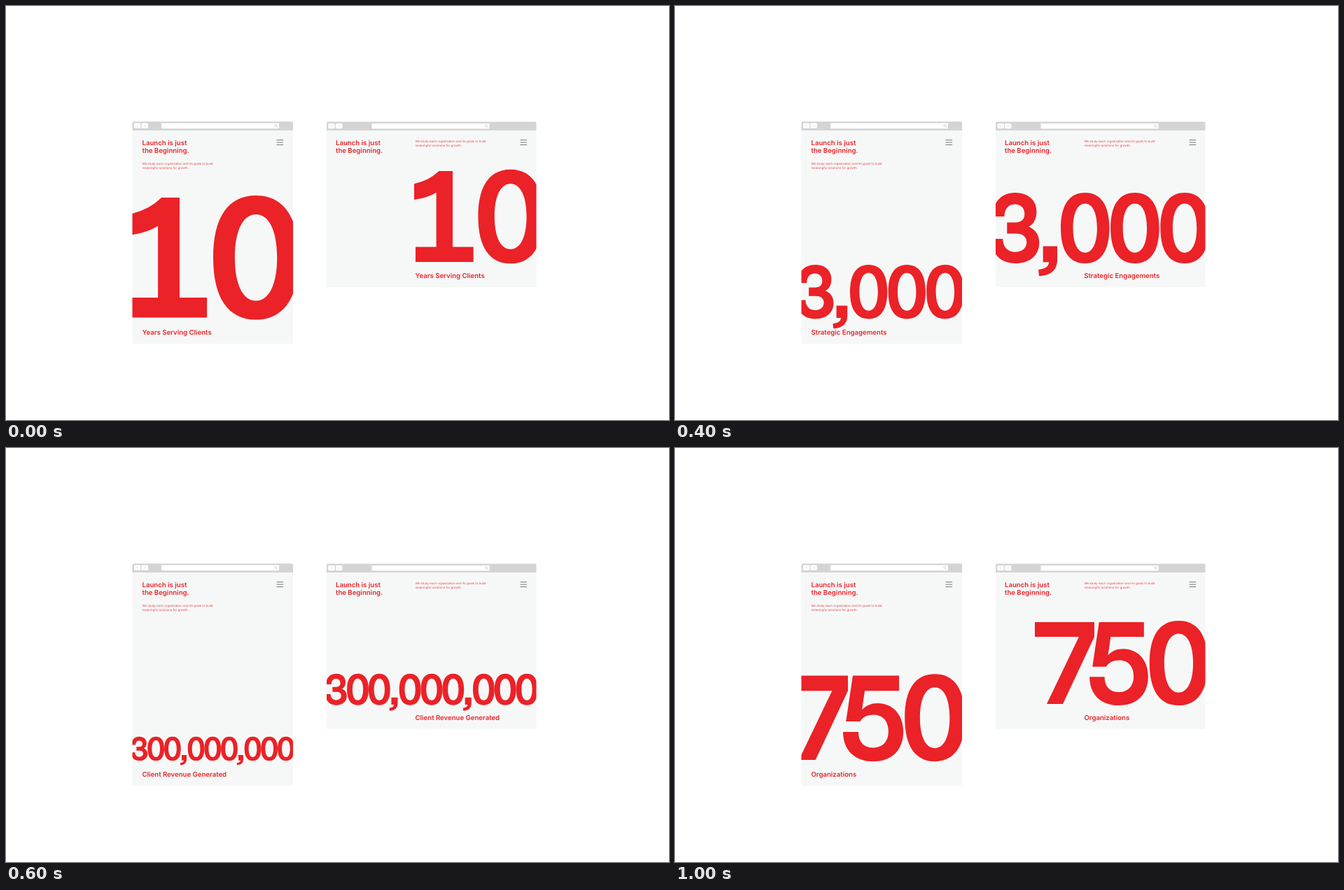
Recreate the animation shown at these times as an HTML page. Size 947 by 592 pixels, loop 1.2 s.

```html
<!DOCTYPE html>
<html lang="en">
<head>
<meta charset="utf-8">
<title>Launch is just the Beginning</title>
<style>
  html, body { margin: 0; width: 100%; height: 100%; overflow: hidden; background: #fff; }
  svg { display: block; width: 947px; height: 592px; }
  text { font-family: Inter, Arial, sans-serif; text-rendering: geometricPrecision; }
  .red { fill: #eb2227; }
  .title { font-size: 9.6px; font-weight: 600; }
  .note { font-size: 4.36px; font-weight: 400; fill-opacity: .85; }
  .page { fill: #f6f8f8; }
  .bar { fill: #d4d4d4; }
  .field { fill: #fff; }
  .icon { fill: none; stroke: #c4c4c4; stroke-width: .7; }
  .menu { fill: none; stroke: #777; stroke-width: 1; }

  .stat { visibility: hidden; animation: 1200ms step-end infinite; }
  .years { animation-name: years; }
  .orgs { animation-name: orgs; }
  .jobs { animation-name: jobs; }
  .revenue { animation-name: revenue; }
  @keyframes years {
    0% { visibility: visible; }
    16.6667%, 100% { visibility: hidden; }
  }
  @keyframes orgs {
    0%, 33.3333% { visibility: hidden; }
    16.6667%, 83.3333% { visibility: visible; }
    100% { visibility: hidden; }
  }
  @keyframes jobs {
    0%, 50%, 83.3333%, 100% { visibility: hidden; }
    33.3333%, 66.6667% { visibility: visible; }
  }
  @keyframes revenue {
    0%, 66.6667%, 100% { visibility: hidden; }
    50% { visibility: visible; }
  }
</style>
</head>
<body>
<svg viewBox="0 0 947 592">
  <defs>
    <!-- numerals: baseline at y 0, cap height 100 -->
    <path id="d0" fill-rule="evenodd" d="M0-50C0-83.7 12.5-101.8 35.6-101.8S71.2-83.7 71.2-50 58.7 1.8 35.6 1.8 0-16.3 0-50ZM18-50C18-27.7 24.7-14 35.6-14S53.2-27.7 53.2-50 46.5-86 35.6-86 18-72.3 18-50Z"/>
    <path id="d1" d="M27.2-100H42.3V-16.6H65.1V0H1.5V-16.6H24.3V-76.4Q14.9-70.5 0-68.5V-86Q16.7-89.5 27.2-100Z"/>
    <path id="d3" d="M0-34.2H16.6C17-22 24-15 35-15C45-15 51.5-21 51.5-29C51.5-37.5 45.5-41.8 36.5-41.8H22.8V-58.3H35.5C44-58.3 48.5-63 48.5-70.5C48.5-79.5 43-85 34.5-85C25-85 19.5-79 18.8-67H2C2-89 15-101.8 35-101.8C54-101.8 66-90.5 66-74C66-64 62-56 54.5-52C64.5-48 70-40 70-28.5C70-10 56 1.8 35 1.8C13.5 1.8 0-11.5 0-34.2Z"/>
    <path id="d5" d="M11.6-100H66.4V-82H25.8L22.5-59.5C27-64.5 33-67.3 41-67.3C59-67.3 71.5-53.5 71.5-33.5C71.5-11.5 57.5 1.8 35.8 1.8C14 1.8 0-11.5 0-33.2H18.3C18.3-21.5 24.5-14.5 35.8-14.5C47-14.5 53.8-22 53.8-33.8C53.8-46 47-53.5 36.5-53.5C29-53.5 23.5-51 20.3-45.6H3.5Z"/>
    <path id="d7" d="M0-100H72.6V-82L34.2 0H14.5L53.8-82H0Z"/>
    <path id="comma" d="M-26-23.4H-5.1V-4C-5.1 11-14 19.5-31.8 20.3L-32.8 11C-23.5 10-17.8 7-17.4 0H-26Z"/>

    <g id="n10"><use href="#d1"/><use href="#d0" x="70.3"/></g>
    <g id="n750"><use href="#d7"/><use href="#d5" x="66.8"/><use href="#d0" x="140"/></g>
    <g id="n3k">
      <use href="#d3" x="-101.5"/><use href="#comma"/>
      <use href="#d0"/><use href="#d0" x="73"/><use href="#d0" x="146"/>
    </g>
    <g id="triple">
      <use href="#comma"/>
      <use href="#d0"/><use href="#d0" x="71.2"/><use href="#d0" x="142.4"/>
    </g>
    <g id="n300m">
      <use href="#d3" x="-243"/><use href="#d0" x="-172.4"/><use href="#d0" x="-101.2"/>
      <use href="#triple"/><use href="#triple" x="243"/>
    </g>

    <g id="tools">
      <rect class="field" width="9.3" height="7.2" rx=".8"/>
      <rect class="field" x="10.6" width="9.3" height="7.2" rx=".8"/>
      <path class="icon" d="M5.2 2.3L3.9 3.6 5.2 4.9M14.6 2.3L15.9 3.6 14.6 4.9"/>
    </g>
    <g id="search">
      <rect class="field" width="168" height="7.6" rx=".6"/>
      <path class="icon" d="M165 3.4a1.5 1.5 0 1 0-3 0a1.5 1.5 0 1 0 3 0M164.6 4.5L166 5.9"/>
    </g>
    <path id="menu" class="menu" d="M0 0H9.6M0 3.4H9.6M0 6.8H9.6"/>

    <clipPath id="tall"><rect x="180.5" y="178" width="229.5" height="305"/></clipPath>
    <clipPath id="wide"><rect x="458" y="178" width="299.5" height="224"/></clipPath>
  </defs>

  <!-- tall window -->
  <rect class="page" x="180.5" y="177" width="229.5" height="306"/>
  <path class="bar" d="M180.5 178V167.2Q180.5 165.2 182.5 165.2H408Q410 165.2 410 167.2V178Z"/>
  <use href="#tools" x="183" y="167.6"/>
  <use href="#search" x="222" y="167.6"/>
  <use href="#menu" x="386.5" y="191.7"/>
  <g class="red title">
    <text x="194.5" y="199.4">Launch is just</text>
    <text x="194.5" y="209.8">the Beginning.</text>
  </g>
  <g class="red note">
    <text x="194.5" y="227">We study each organization and its goals to build</text>
    <text x="194.5" y="233.4">meaningful solutions for growth.</text>
  </g>

  <!-- wide window -->
  <rect class="page" x="458" y="177" width="299.5" height="225"/>
  <path class="bar" d="M458 178V167.6Q458 165.6 460 165.6H755.5Q757.5 165.6 757.5 167.6V178Z"/>
  <use href="#tools" x="460.4" y="168"/>
  <use href="#search" x="522.5" y="168"/>
  <use href="#menu" x="734.5" y="191.7"/>
  <g class="red title">
    <text x="471" y="199.4">Launch is just</text>
    <text x="471" y="209.8">the Beginning.</text>
  </g>
  <g class="red note">
    <text x="584.5" y="195">We study each organization and its goals to build</text>
    <text x="584.5" y="201.4">meaningful solutions for growth.</text>
  </g>

  <g class="red title">
    <g class="stat years">
      <g clip-path="url(#tall)"><use href="#n10" transform="translate(175.4 445.5) scale(1.715)"/></g>
      <g clip-path="url(#wide)"><use href="#n10" transform="translate(583 366) scale(1.3)"/></g>
      <text x="194.5" y="469.5">Years Serving Clients</text>
      <text x="584.5" y="388.8">Years Serving Clients</text>
    </g>
    <g class="stat orgs">
      <g clip-path="url(#tall)"><use href="#n750" transform="translate(159.5 446) scale(1.205)"/></g>
      <g clip-path="url(#wide)"><use href="#n750" transform="translate(514 366) scale(1.17)"/></g>
      <text x="194.5" y="469.5">Organizations</text>
      <text x="584.5" y="388.8">Organizations</text>
    </g>
    <g class="stat jobs">
      <g clip-path="url(#tall)"><use href="#n3k" transform="translate(250 446.1) scale(.748)"/></g>
      <g clip-path="url(#wide)"><use href="#n3k" transform="translate(551 366.3) scale(.975)"/></g>
      <text x="194.5" y="469.5">Strategic Engagements</text>
      <text x="584.2" y="388.8">Strategic Engagements</text>
    </g>
    <g class="stat revenue">
      <g clip-path="url(#tall)"><use href="#n300m" transform="translate(259.7 446.7) scale(.333)"/></g>
      <g clip-path="url(#wide)"><use href="#n300m" transform="translate(561.7 366.9) scale(.433)"/></g>
      <text x="194.5" y="469.5">Client Revenue Generated</text>
      <text x="584.5" y="388.8">Client Revenue Generated</text>
    </g>
  </g>
</svg>
</body>
</html>
```
